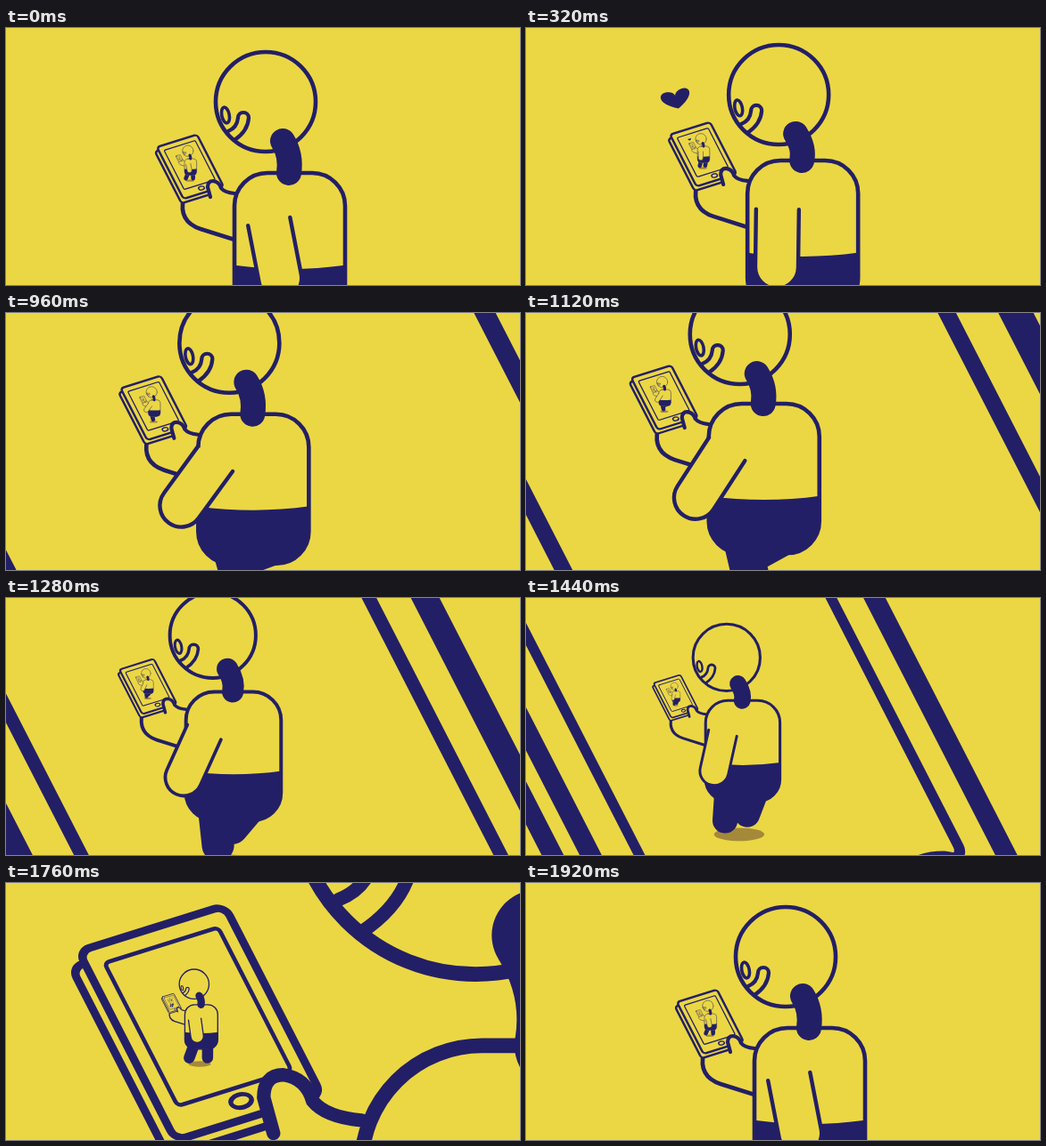
These frames come from a looping animation (576 by 289 pixels, 1.96 s). An HTML page with a canvas:

```html
<!DOCTYPE html>
<html lang="en">
<head>
<meta charset="utf-8">
<title>Endless phone</title>
<style>
  html, body { margin: 0; width: 100%; height: 100%; overflow: hidden; background: #ebd744; }
  canvas { display: block; width: 576px; height: 289px; }
</style>
</head>
<body>
<canvas id="stage" width="576" height="289"></canvas>
<script>
const ctx = document.getElementById('stage').getContext('2d');
const YELLOW = '#ebd744', INK = '#231f66', SHADOW = '#a5893a';
const LOOP = 1960, STEP = 40, CYCLE = 1920, TURN = 1160;

// Everything in a figure is measured from the top left of its torso.
const SCREEN = { x: -50.5, y: -9.5 };
const NESTED = { x: -56, y: -16, s: 0.11 };

const lerp = (a, b, k) => a + (b - a) * k;
const clamp = k => Math.max(0, Math.min(1, k));
const wave = (t, period) => Math.cos(2 * Math.PI * t / period);

function shape(path, fill, width) {
  if (fill) { ctx.fillStyle = fill; ctx.fill(path); }
  if (width) { ctx.lineWidth = width; ctx.strokeStyle = INK; ctx.stroke(path); }
}

function box(x, y, w, h, r) {
  const p = new Path2D();
  p.roundRect(x, y, w, h, r);
  return p;
}

function oval(x, y, rx, ry, turn = 0) {
  const p = new Path2D();
  p.ellipse(x, y, rx, ry, turn, 0, 2 * Math.PI);
  return p;
}

const TORSO = box(0, 0, 124, 168, [37, 37, 36, 36]);
const SKIRT = new Path2D('M-5 103Q62 113 129 103V175H-5Z');
const FOREARM = new Path2D('M-57 28C-62 50 -50 59 -38 63L0 75V23H-16');
const FOREARM_LINE = new Path2D('M-57 28C-62 50 -50 59 -38 63L0 75');
const THUMB = new Path2D('M-27 27L-30 16Q-30 9 -24 9Q-17 10 -15 17Q-11 22 0 23');
const CHEEK = new Path2D('M-42 33Q-32 29 -31 18A6 6 0 0 1 -19 18Q-20 33 -35 43');
const HEART = new Path2D('M0 11C-23 0 -18 -11 -8.5 -10Q-1 -9 0 -4Q1 -9 8.5 -10C18 -11 23 0 0 11Z');
const SLEEVE = new Path2D('M-24 25V90A24 24 0 0 0 24 90V25');

function pose(t) {
  const swing = wave(t, CYCLE);
  const grow = clamp((t - 120) / 160);
  const fade = t < 400 ? 1 : t < 640 ? lerp(1, 0.82, (t - 400) / 240) : lerp(0.82, 0, clamp((t - 640) / 200));
  return {
    arm: (-12.5 + 23.5 * swing) * Math.PI / 180,
    head: -76 - 4 * wave(t, CYCLE / 2),
    stride: 0.5 + 0.5 * swing,
    heart: grow * fade
  };
}

function drawLegs(stride) {
  const spread = 37 * stride;
  shape(oval(56, 224, 42, 11), SHADOW);
  const legs = new Path2D();
  legs.moveTo(86, 148);
  legs.lineTo(51 + spread, 201 - 40 * (1 - stride) ** 2);
  legs.moveTo(36, 148);
  legs.lineTo(51 - spread, 201);
  shape(legs, null, 42);
}

function drawPhone() {
  const slab = box(-23.8, -30, 47, 65.5, 3.5);
  const tilt = () => ctx.transform(0.954, -0.3, 0.455, 0.89, SCREEN.x, SCREEN.y);
  ctx.save();
  ctx.translate(-2.2, 5);
  tilt();
  shape(slab, YELLOW, 2.5);
  ctx.restore();
  ctx.save();
  tilt();
  shape(slab, YELLOW, 2.5);
  shape(box(-18.3, -24.1, 36.6, 49.5, 1.5), null, 1.3);
  shape(oval(0, 29.8, 3.2, 2.1), null, 1.4);
  ctx.restore();
}

function drawHead(y) {
  ctx.save();
  ctx.translate(35, y);
  shape(oval(0, 0, 56, 56), YELLOW, 4.6);
  shape(oval(-45, 15, 4.2, 9, -0.2), null, 3.6);
  shape(CHEEK, null, 4.2);
  ctx.restore();
  shape(new Path2D(`M54 ${y + 44}Q64 ${y + 60} 61 0`), null, 28);
}

function drawTorso() {
  shape(TORSO, YELLOW);
  ctx.save();
  ctx.clip(TORSO);
  shape(SKIRT, INK);
  ctx.restore();
  shape(TORSO, null, 4.6);
}

function figure(place, p, depth, child) {
  const { x, y, s } = place;
  const inner = child || { x: x + NESTED.x * s, y: y + NESTED.y * s, s: s * NESTED.s };
  ctx.save();
  ctx.setTransform(s, 0, 0, s, x, y);
  ctx.lineCap = ctx.lineJoin = 'round';
  drawLegs(p.stride);
  shape(FOREARM, YELLOW);
  shape(FOREARM_LINE, null, 4.6);
  drawPhone();
  if (depth > 0) figure(inner, p, depth - 1);
  shape(THUMB, YELLOW, 4.2);
  drawTorso();
  drawHead(p.head);

  ctx.save();
  ctx.translate(34, 30);
  ctx.rotate(-p.arm);
  shape(SLEEVE, YELLOW, 4.4);
  ctx.restore();

  if (p.heart > 0) {
    ctx.translate(-80, -69);
    ctx.rotate(-0.25);
    ctx.scale(p.heart, p.heart);
    shape(HEART, INK);
  }
  ctx.restore();
}

// The walker bobs up and left, then shrinks into the screen.
function walkerPlace(t) {
  const drift = Math.min(1, t / TURN);
  const k = clamp((t - TURN) / (CYCLE - TURN));
  const s = lerp(1, NESTED.s, k);
  const bob = 1.5 * (wave(t, CYCLE / 2) - 1) * s;
  return {
    x: 256 - 54 * drift ** 1.5 - 2 * k,
    y: 163 - 63 * drift ** 1.3 + 47 * k + bob,
    s
  };
}

// The holder of the surrounding phone, seen as the camera pulls back.
function holderPlace(t) {
  const k = Math.max(0, CYCLE - t) / 320;
  const s = 1 + 5.3 * k;
  return { x: 205.5 + 17 * k - SCREEN.x * s, y: 153.5 - 10.5 * k - SCREEN.y * s, s };
}

function draw(t) {
  const p = pose(t), walker = walkerPlace(t);
  ctx.setTransform(1, 0, 0, 1, 0, 0);
  ctx.fillStyle = YELLOW;
  ctx.fillRect(0, 0, 576, 289);
  if (t > 800) figure(holderPlace(t), p, 3, walker);
  else figure(walker, p, 2);
}

const start = performance.now();
function tick() {
  const t = (performance.now() - start) % LOOP;
  draw(Math.floor(t / STEP) * STEP);
  requestAnimationFrame(tick);
}
tick();
</script>
</body>
</html>
```
